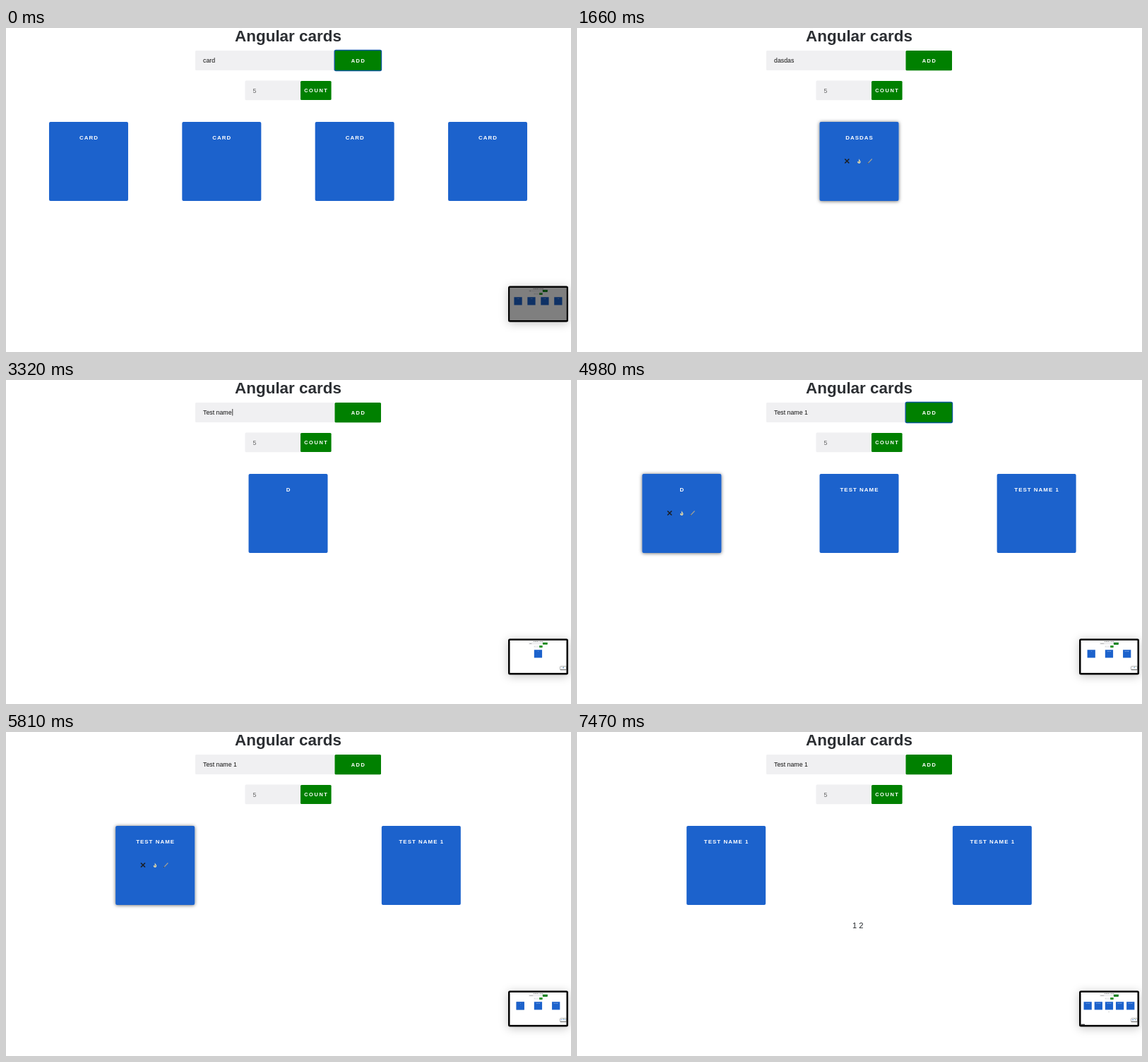
Animation, 800 px wide and 459 px high, one loop 8300 ms. Source, as an HTML page:

```html
<!DOCTYPE html>
<html lang="en">
<head>
<meta charset="utf-8">
<title>Angular cards</title>
<style>
  html, body { margin: 0; width: 100%; height: 100%; overflow: hidden; background: #fff; }
  svg { display: block; width: 100%; height: 100%; }
  text { font-family: "Liberation Sans", Arial, sans-serif; white-space: pre; }
  .title { font-size: 22.45px; font-weight: bold; fill: #2c2f33; }
  .field { font-size: 8.8px; fill: #111; }
  .button { font-size: 7.4px; font-weight: bold; letter-spacing: 1.6px; fill: #fff; }
  .name { font-size: 7.9px; font-weight: bold; letter-spacing: 1.05px; fill: #fff; }
  .pages { font-size: 11.1px; fill: #212529; }
  .status { font-family: Inter, sans-serif; font-size: 6.7px; fill: #c8cacd; }
</style>
</head>
<body>
<svg viewBox="0 0 800 459">
  <defs>
    <clipPath id="screen"><rect width="800" height="459"/></clipPath>
    <filter id="lift" x="-20%" y="-20%" width="140%" height="140%">
      <feDropShadow dx="0" dy="0.5" stdDeviation="2.8" flood-opacity="0.6"/>
    </filter>
    <filter id="float" x="-40%" y="-60%" width="180%" height="220%">
      <feDropShadow dx="0" dy="2" stdDeviation="6.5" flood-opacity="0.24"/>
    </filter>
  </defs>
  <g id="stage"></g>
</svg>
<script>
const STEP = 830;
const MINI = 0.1005;

const repeat = (name, n) => Array(n).fill(name);
const one = 'Test name 1';

// thumb: what the floating preview shows; hover: index of the raised card
const opening = { input: 'card', focus: true, cards: repeat('card', 4) };
const states = [
  { ...opening, thumb: opening, dim: true },
  { input: 'dasdas', focus: true, cards: ['dasdas'] },
  { input: 'dasdas', cards: ['dasdas'], hover: 0 },
  { input: 'dasdas', cards: ['d'] },
  { input: 'Test name', caret: true, cards: ['d'] },
  { input: one, focus: true, cards: ['d', 'Test name', one] },
  { input: one, focus: true, cards: ['d', 'Test name', one], hover: 0 },
  { input: one, cards: ['Test name', one], hover: 0 },
  { input: one, focus: true, cards: ['Test name', ...repeat(one, 4)], pages: true, status: true },
  { input: one, cards: repeat(one, 2), pages: true },
];
for (let i = 3; i < states.length; i++) states[i].thumb = states[i - 1];

const rect = (x, y, w, h, fill, extra = '') =>
  `<rect x="${x}" y="${y}" width="${w}" height="${h}" fill="${fill}" ${extra}/>`;
const text = (cls, x, y, str, anchor = 'start') =>
  `<text class="${cls}" x="${x}" y="${y}" text-anchor="${anchor}">${str}</text>`;

function icons(x) {
  return `<g transform="translate(${x} 188.5)" fill="none">
    <path d="M-20.2 -3L-14.2 3M-14.2 -3L-20.2 3" stroke="#1c1f24" stroke-width="1.6"/>
    <path d="M-0.4 -3.2Q0.6 -1.2 2 0.2Q2.6 3.2 -0.2 3.4Q-3 3 -2.2 0.6L-0.6 0.8Z" fill="#d9d6b4"/>
    <path d="M-0.6 1.6L0.9 0.6" stroke="#5d6350" stroke-width="0.7"/>
    <path d="M12.2 3.3L18.2 -3" stroke="#a9a595" stroke-width="1.1"/>
    <path d="M12 3.5L13.2 2.3" stroke="#30343a" stroke-width="1"/>
  </g>`;
}

function card(name, i, list, hover) {
  const cx = 399.5 + ((i + 0.5) / list.length - 0.5) * 753.4;
  const up = i === hover;
  return rect(cx - 56, 133, 112, 112, '#1c62cc', `rx="2" ${up ? 'filter="url(#lift)"' : ''}`)
    + text('name', cx + 0.5, 158, name.toUpperCase(), 'middle')
    + (up ? icons(cx) : '');
}

function preview(s, depth) {
  const top = s.dim ? 365.5 : 366.5;
  return rect(711, top, 85, 51, '#000', 'rx="2.5" filter="url(#float)"')
    + `<g transform="translate(713.3 ${top + 2.3}) scale(${MINI})" clip-path="url(#screen)">`
    + page(s.thumb, depth + 1)
    + (s.dim ? rect(0, 0, 800, 459, '#000', 'opacity="0.5"') : '')
    + '</g>';
}

function page(s, depth = 0) {
  const add = s.focus
    ? rect(465.2, 31.5, 66.3, 29, '#008000', 'rx="2" stroke="#0b5798" stroke-width="1.4"')
    : rect(465.5, 32, 65.5, 28.3, '#008000', 'rx="1.5"');
  return rect(0, 0, 800, 459, '#fff')
    + text('title', 399.5, 19, 'Angular cards', 'middle')
    + rect(268, 32, 197.5, 28, '#f0f0f2', 'rx="1.5"')
    + text('field', 279, 49, s.input)
    + (s.caret ? rect(320.4, 41, 0.8, 9.5, '#111') : '')
    + add
    + text('button', 499.1, 48.7, 'ADD', 'middle')
    + rect(338.5, 74.5, 79, 27.7, '#f0f0f2', 'rx="1.5"')
    + `<g opacity="0.62">${text('field', 349.5, 91.5, '5')}</g>`
    + rect(417, 75, 43.6, 27, '#008000', 'rx="1.5"')
    + text('button', 439.3, 91.2, 'COUNT', 'middle')
    + s.cards.map((name, i, list) => card(name, i, list, s.hover)).join('')
    + (s.pages ? text('pages', 390, 277.6, '1 2') : '')
    + (s.status ? rect(-4, 447.7, 61, 16, '#35363a', 'rx="2"')
      + text('status', 53, 456.2, 'localhost:4200/#', 'end') : '')
    + (s.thumb && depth < 2 ? preview(s, depth) : '');
}

const stage = document.getElementById('stage');
const start = performance.now();
let shown = -1;

function draw(now) {
  const i = Math.floor(Math.max(0, now - start) / STEP) % states.length;
  if (i !== shown) stage.innerHTML = page(states[shown = i]);
  requestAnimationFrame(draw);
}
draw(start);
</script>
</body>
</html>
```
